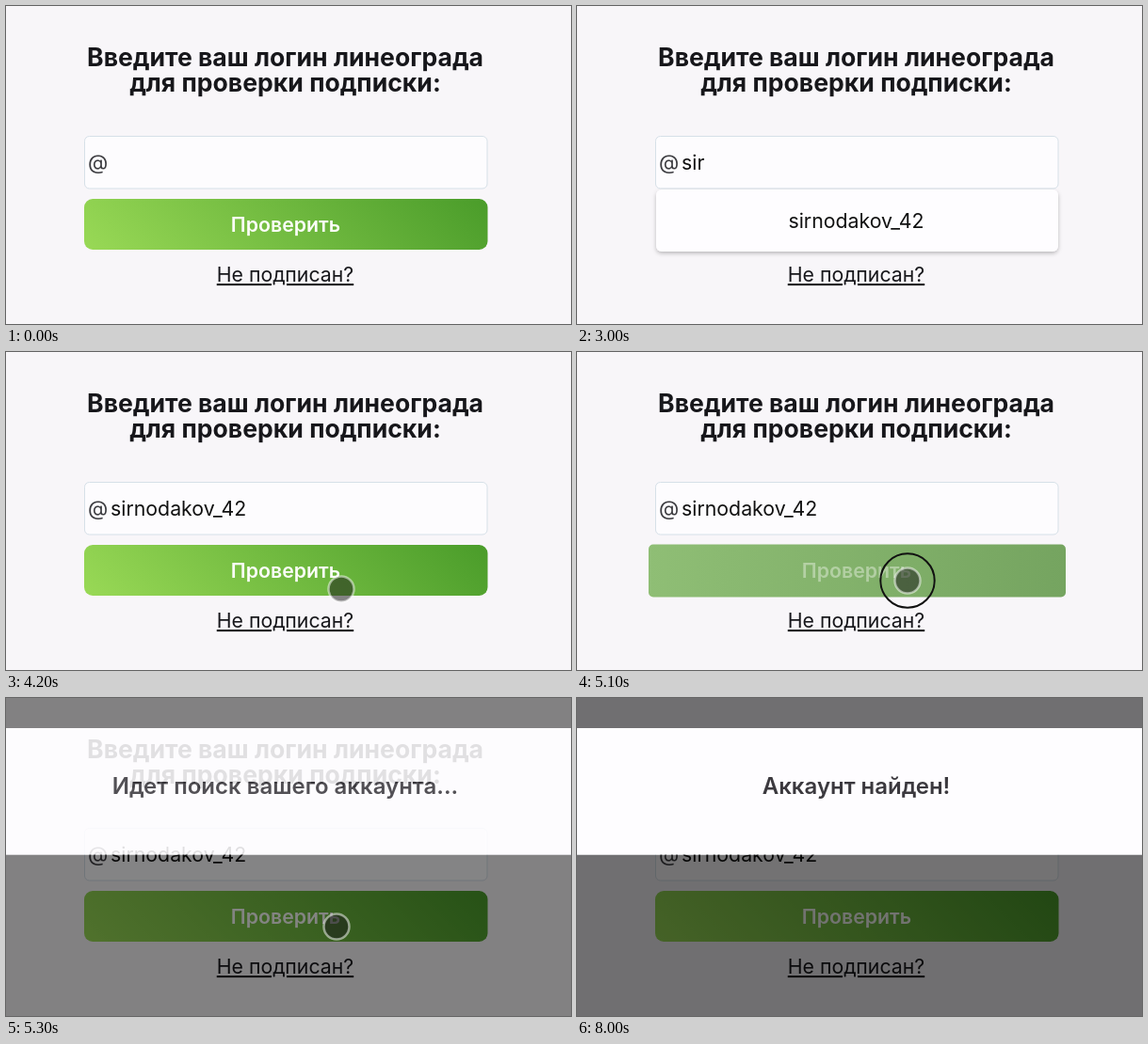
An HTML page that plays this animation: 600 px wide and 338 px high, repeating every 8.5 s.

```html
<!DOCTYPE html>
<html lang="ru">
<head>
<meta charset="utf-8">
<style>
html, body { margin: 0; width: 100%; height: 100%; overflow: hidden; background: #f8f6f9; }
svg { display: block; width: 100vw; height: 100vh; font: 21.3px Inter, sans-serif; fill: #17171b; }
.mid { text-anchor: middle; }
.head { font-size: 26.6px; font-weight: 700; }
.note { font-size: 24px; font-weight: 600; fill: #3b393e; }
.label { font-weight: 600; fill: #fbfdf8; }
.link { text-decoration: underline 1.4px; text-underline-offset: 2px; text-decoration-skip-ink: none; }
</style>
</head>
<body>
<svg viewBox="0 0 600 338">
  <defs>
    <linearGradient id="green" gradientUnits="userSpaceOnUse" x1="176.5" y1="352.5" x2="417.5" y2="111.5">
      <stop stop-color="#99d956"/><stop offset="1" stop-color="#4a9c2a"/>
    </linearGradient>
    <linearGradient id="faded">
      <stop stop-color="#8fbe75"/><stop offset="1" stop-color="#75a460"/>
    </linearGradient>
    <filter id="shadow" x="-5%" y="-20%" width="110%" height="150%">
      <feDropShadow dx="0" dy="2" stdDeviation="2" flood-opacity=".25"/>
    </filter>
  </defs>
  <rect width="600" height="338" fill="#f8f6f9"/>
  <g class="mid head">
    <text x="296.5" y="64">Введите ваш логин линеограда</text>
    <text x="296.5" y="91">для проверки подписки:</text>
  </g>
  <rect x="83.5" y="138.5" width="427.5" height="55.5" rx="5" fill="#fdfcfe" stroke="#d6e0e8"/>
  <text x="87" y="173.5" font-size="22" fill="#3c3c40">@</text>
  <text id="typed" x="111" y="174" fill="#111"></text>
  <rect id="caret" y="153" width="1.5" height="26" fill="#222"/>
  <rect id="button" x="83" y="205" width="428.5" height="54" rx="9" fill="url(#green)"/>
  <rect id="pressed" x="76" y="204.5" width="443" height="56" rx="5" fill="url(#faded)"/>
  <text id="label" class="mid label" x="297" y="240">Проверить</text>
  <text class="mid link" x="296.5" y="293">Не подписан?</text>
  <g id="list">
    <rect x="84" y="195" width="427" height="66" rx="6" fill="#fefdff" filter="url(#shadow)"/>
    <text id="option" class="mid" x="296.5" y="236" fill="#111"></text>
  </g>
  <path id="shade" d="M0 0h600v32H0zM0 166.5h600V338H0z" fill="#000"/>
  <g id="dialog">
    <rect y="32" width="600" height="134.5" fill="#fefdff"/>
    <text id="note" class="mid note" x="296.5" y="102"></text>
  </g>
  <g id="cursor">
    <circle r="13.5" fill="#1c1c1c" fill-opacity=".53" stroke="#fff" stroke-opacity=".5" stroke-width="2.5"/>
    <circle id="ring" fill="none" stroke="#111" stroke-width="2"/>
  </g>
</svg>
<script>
const LOOP = 8500, STEP = 100, LOGIN = 'sirnodakov_42';
const $ = id => document.getElementById(id);
const set = (id, name, value) => $(id).setAttribute(name, value);
const show = (id, on) => set(id, 'opacity', +on);
const within = (t, a, b) => t >= a && t < b;
const ramp = (t, a, b) => Math.min(1, Math.max(0, (t - a) / (b - a)));
const easeOut = p => 1 - (1 - p) ** 3;
const easeInOut = p => p * p * (3 - 2 * p);

function typedText(t) {
  if (t >= 3700) return LOGIN;
  return LOGIN.slice(0, [1900, 2300, 2700].filter(at => t >= at).length);
}

function draw(t) {
  $('typed').textContent = typedText(t);
  set('caret', 'x', 111.5 + $('typed').getComputedTextLength());
  show('caret', [[100, 600], [1100, 1600], [1900, 3000], [3500, 3700]].some(s => within(t, ...s)));

  const listed = within(t, 2000, 3700), pressed = within(t, 5000, 5200);
  show('list', listed);
  show('button', !listed && !pressed);
  show('pressed', pressed);
  set('label', 'opacity', pressed ? 0.4 : 1);

  const open = easeOut(ramp(t, 5100, 5500));
  set('shade', 'opacity', 0.545 * open);
  set('dialog', 'opacity', open);
  $('note').textContent = t < 7900 ? 'Идет поиск вашего аккаунта...' : 'Аккаунт найден!';

  const enter = easeOut(ramp(t, 3200, 3500)), shift = easeInOut(ramp(t, 4200, 4700));
  set('cursor', 'transform', `translate(${356 - 5 * shift} ${314 - 62 * enter - 9 * shift})`);
  set('cursor', 'opacity', t < 3200 ? 0 : 1 - ramp(t, 6400, 6700));
  const click = [3500, 5000].find(at => within(t, at, at + 200));
  show('ring', click !== undefined);
  if (click !== undefined) set('ring', 'r', 21.5 + 7.2 * (t - click) / 100);
}

$('option').textContent = LOGIN;
const start = performance.now();
function frame() {
  const t = (performance.now() - start) % LOOP;
  draw(Math.floor(t / STEP) * STEP);
  requestAnimationFrame(frame);
}
frame();
</script>
</body>
</html>
```
